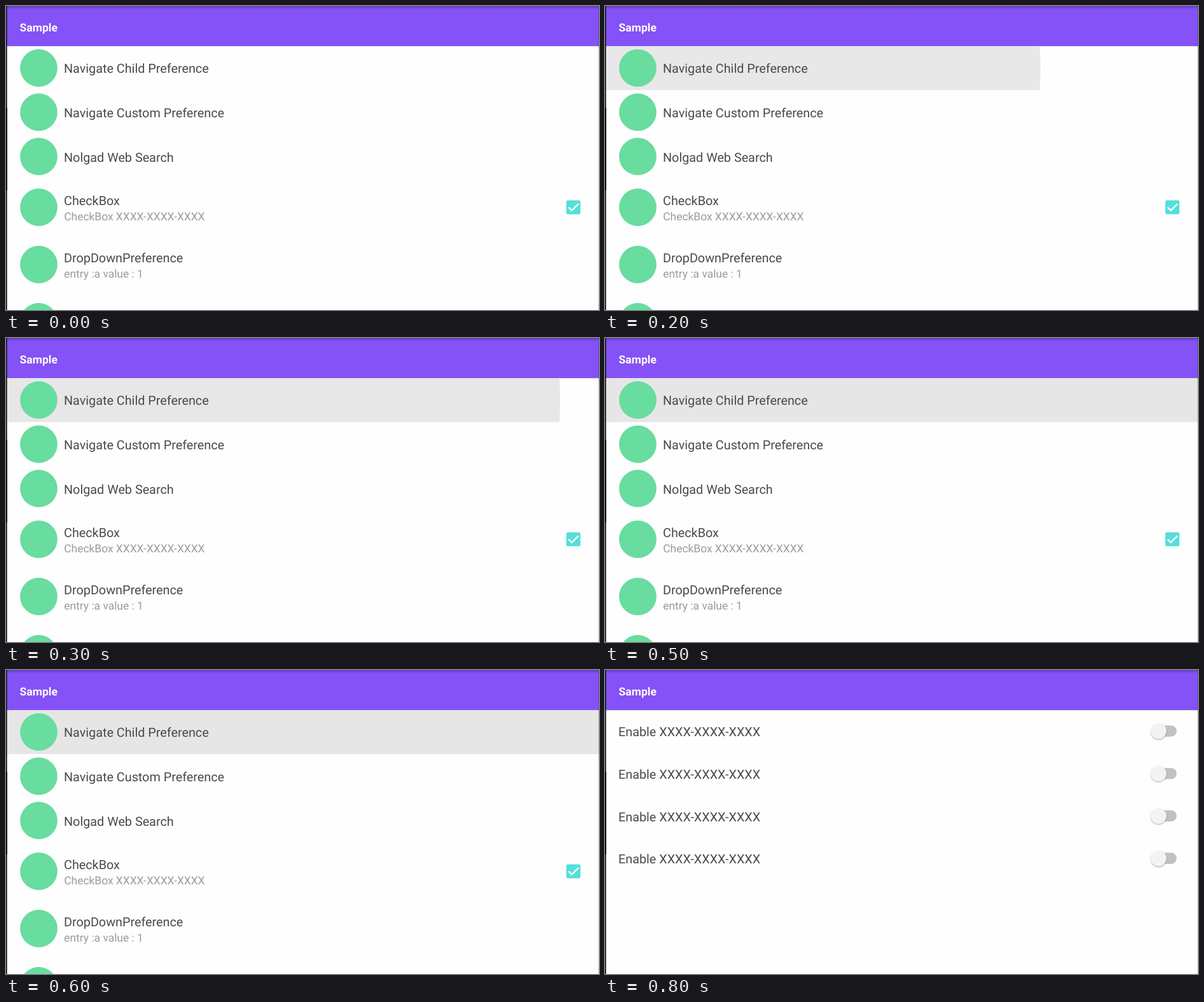
Animation, 932 px wide and 478 px high, one loop 1600 ms. Source, as an HTML page:

```html
<!DOCTYPE html>
<html lang="en">
<head>
<meta charset="utf-8">
<title>Preferences</title>
<style>
  html, body { margin: 0; width: 100%; height: 100%; overflow: hidden; background: #fefefe; }
  svg { display: block; width: 932px; height: 478px; }
  text { font-family: Roboto, sans-serif; white-space: pre; text-rendering: geometricPrecision; }
  .title { font-size: 19.8px; fill: #4a4a4a; }
  .note { font-size: 17.4px; fill: #9b9b9b; }
  .head { font-size: 17.5px; font-weight: 600; fill: #fff; }
</style>
</head>
<body>
<svg viewBox="0 0 932 478">
  <defs>
    <clipPath id="row"><rect x="1.5" y="63" width="930.5" height="69.3"/></clipPath>
    <linearGradient id="status" x2="0" y2="1">
      <stop offset="0" stop-color="#6540bd"/>
      <stop offset=".5" stop-color="#7047d2"/>
      <stop offset="1" stop-color="#8452f6"/>
    </linearGradient>
    <filter id="soft" x="-30%" y="-30%" width="160%" height="160%">
      <feGaussianBlur stdDeviation="1"/>
    </filter>
  </defs>
  <rect width="932" height="478" fill="#fefefe"/>
  <g id="list"><circle id="ripple" clip-path="url(#row)" cy="97.5"/></g>
  <g id="child"></g>
  <rect y="63" width="932" height="1" fill="#e6e3ec"/>
  <rect width="932" height="63" fill="#8452f6"/>
  <rect width="932" height="5" fill="url(#status)"/>
  <text class="head" x="21.6" y="40">Sample</text>
  <rect width="1.7" height="478" fill="#1c1c1c"/>
  <rect y="160" width="1.9" height="130" fill="#000"/>
  <rect x="931" width="1" height="478" opacity=".2"/>
</svg>
<script>
const $ = id => document.getElementById(id);
const list = $('list'), child = $('child'), ripple = $('ripple');

function add(parent, tag, attrs, text = '') {
  const el = document.createElementNS(parent.namespaceURI, tag);
  for (const key in attrs) el.setAttribute(key, attrs[key]);
  el.textContent = text;
  parent.append(el);
}

// icon centre, label, summary
const rows = [
  [97.5, 'Navigate Child Preference'],
  [167, 'Navigate Custom Preference'],
  [236.7, 'Nolgad Web Search'],
  [316.5, 'CheckBox', 'CheckBox XXXX-XXXX-XXXX'],
  [406.5, 'DropDownPreference', 'entry :a value : 1'],
  [496.5, 'ListPreference', 'entry :a value : 1']
];
for (const [y, label, note] of rows) {
  add(list, 'circle', { cx: 51.5, cy: y, r: 29.4, fill: '#69dc9f' });
  add(list, 'text', { class: 'title', x: 91, y: y + (note ? -3.5 : 7.8) }, label);
  if (note) add(list, 'text', { class: 'note', x: 91.3, y: y + 20.6 }, note);
}
add(list, 'rect', { x: 880.6, y: 305.4, width: 22.2, height: 22.2, rx: 2.5, fill: '#55dfda' });
add(list, 'path', { d: 'M884.2 316.5l5 5 10.4-10.4', fill: 'none', stroke: '#fff', 'stroke-width': 2.4 });

for (let i = 0; i < 4; i++) {
  const y = 96 + i * 66.7;
  add(child, 'text', { class: 'title', x: 21, y: y + 8.1 }, 'Enable XXXX-XXXX-XXXX');
  add(child, 'rect', { x: 862, y: y - 8.8, width: 36.5, height: 17.6, rx: 8.8, fill: '#c1c1c1' });
  add(child, 'circle', { cx: 870, cy: y + 1.4, r: 12.4, fill: '#000', opacity: .28, filter: 'url(#soft)' });
  add(child, 'circle', { cx: 870, cy: y, r: 12.4, fill: '#f3f3f3' });
}

// right edge, radius and fill of the touch ripple, one entry per tick
const TICK = 100, LOOP = 1600, SWITCH = 7;
const wave = [
  [0, 0, '#fefefe'],
  [330, 180, '#f3f3f3'],
  [684.5, 372, '#e8e8e8'],
  [871, 440, '#e7e7e7'],
  [918, 463, '#e6e6e6'],
  [960, 490, '#e6e6e6'],
  [960, 490, '#e6e6e6']
];

function draw(now) {
  const tick = Math.floor(now % LOOP / TICK);
  const open = tick >= SWITCH;
  list.style.display = open ? 'none' : '';
  child.style.display = open ? '' : 'none';
  if (!open) {
    const [edge, r, fill] = wave[tick];
    ripple.setAttribute('cx', edge - r);
    ripple.setAttribute('r', r);
    ripple.setAttribute('fill', fill);
  }
}

const start = performance.now();
function loop() {
  draw(performance.now() - start);
  requestAnimationFrame(loop);
}
loop();
</script>
</body>
</html>
```
